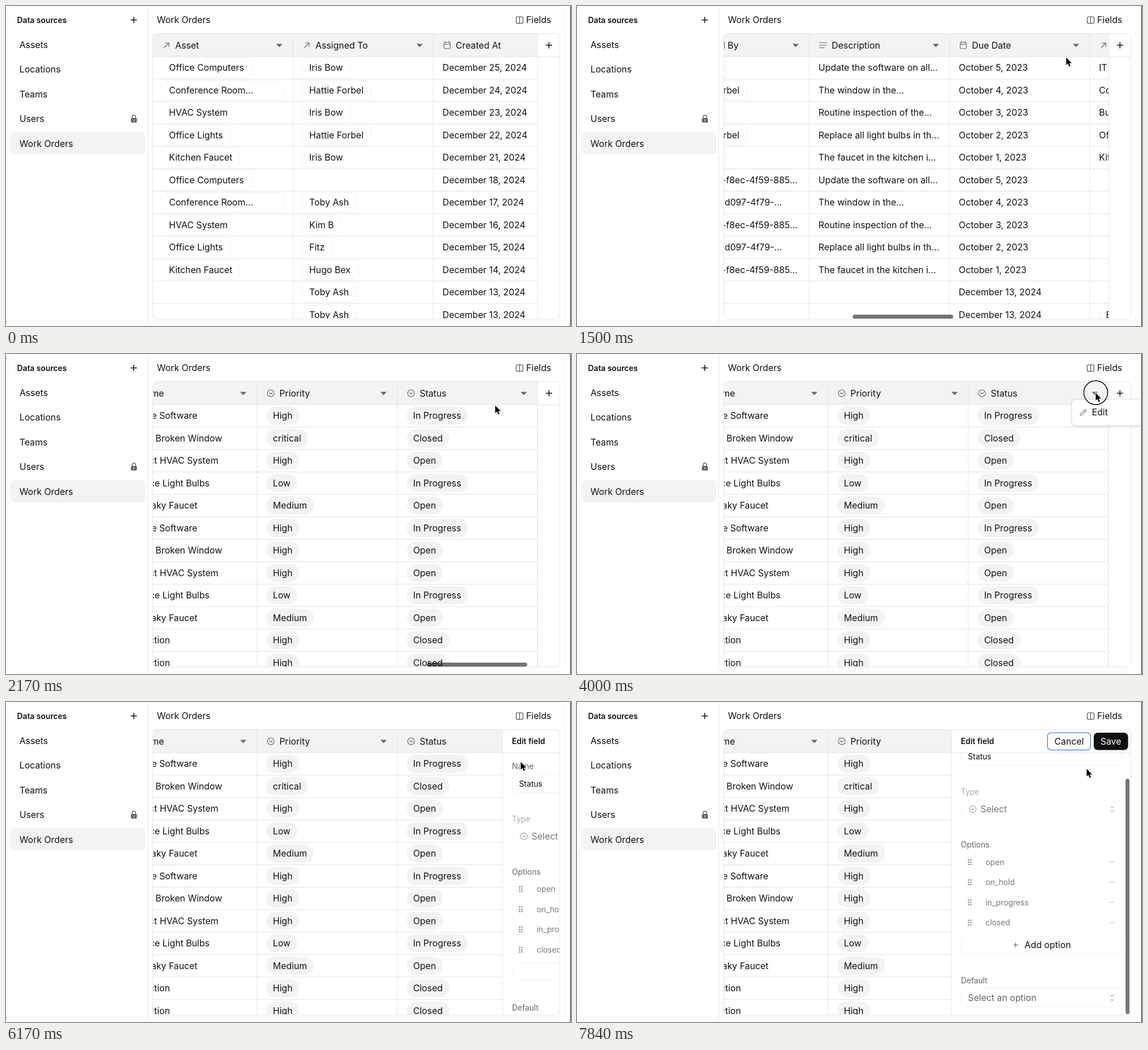
These frames come from a looping animation (995x563 px, 8 s). An HTML page with a canvas:

```html
<!DOCTYPE html>
<html lang="en">
<head>
<meta charset="utf-8">
<title>Work Orders</title>
<style>
html, body { margin: 0; width: 100%; height: 100%; overflow: hidden; background: #fff; }
canvas { display: block; }
</style>
</head>
<body>
<canvas id="stage" width="995" height="563"></canvas>
<script>
const c = document.getElementById('stage').getContext('2d');
const LOOP = 8000, TICK = 1000 / 6;
const COL = 247, ROW = 39.5, LEFT = 258.5, RIGHT = 936, MAX_SCROLL = 1792.5;
const INK = '#111', GRAY = '#666', LINE = '#e6e6e5', SOFT = '#f3f3f2';

// Values: "*" marks an outlined chip, "~" a filled pill.
const people = '*Iris Bow|*Hattie Forbel|*Iris Bow|*Hattie Forbel|*Iris Bow|';
const twice = s => s + s;
const idA = '9a4e0b65-f8ec-4f59-885…|', idB = 'bd341bb2-d097-4f79-…|';
const columns = [
  ['Asset', arrow, twice('*Office Computers|*Conference Room…|*HVAC System|*Office Lights|*Kitchen Faucet|')],
  ['Assigned To', arrow, people + '|*Toby Ash|*Kim B|*Fitz|*Hugo Bex|*Toby Ash|*Toby Ash'],
  ['Created At', calendar, [25, 24, 23, 22, 21, 18, 17, 16, 15, 14, 13, 13].map(d => `December ${d}, 2024`).join('|')],
  ['Created By', arrow, people + twice(idA + idB) + idA + 'Kim B|Kim B'],
  ['Description', lines, twice('Update the software on all…|The window in the…|Routine inspection of the…|Replace all light bulbs in th…|The faucet in the kitchen i…|')],
  ['Due Date', calendar, twice([5, 4, 3, 2, 1].map(d => `October ${d}, 2023|`).join('')) + 'December 13, 2024|December 13, 2024'],
  ['Location', arrow, 'IT Department|Conference Room|Building Roof|Office Floor|Kitchen|||||||*East Wing'],
  ['Name', lines, twice('Update Software|Repair Broken Window|Inspect HVAC System|Replace Light Bulbs|Fix Leaky Faucet|') + 'Inspection|Inspection'],
  ['Priority', select, '~High|~critical|~High|~Low|~Medium|~High|~High|~High|~Low|~Medium|~High|~High'],
  ['Status', select, '~In Progress|~Closed|~Open|~In Progress|~Open|~In Progress|~Open|~Open|~In Progress|~Open|~Closed|~Closed']
].map(([title, icon, cells]) => ({ title, icon, cells: cells.split('|') }));

// Keys are [tick, value...]; null before the first key.
const scrollKeys = [[0, 0], [6, 0], [7, 392], [9, 837.5], [13, MAX_SCROLL]];
const thumbKeys = [[7, 1], [15, 1], [18, 0]];
const cursorKeys = [[3, 850, 330], [4, 860, 150], [5, 861, 90], [15, 861, 90], [18, 913, 68],
  [26, 913, 68], [29, 915, 100], [30, 915, 100], [35, 906, 105], [41, 906, 105], [43, 897, 117]];
const panelKeys = [[37, 215], [38, 50], [39, 0]];
const bodyKeys = [[0, 0], [45, 0], [46, 26], [47, 47.5]];

function at(keys, k) {
  if (k < keys[0][0]) return null;
  const i = keys.findIndex(key => key[0] > k);
  if (i < 0) return keys[keys.length - 1].slice(1);
  const a = keys[i - 1], b = keys[i], u = (k - a[0]) / (b[0] - a[0]);
  return a.slice(1).map((v, j) => v + (b[j + 1] - v) * u);
}

function text(s, x, cy, color = INK, size = 15.8, weight = 400) {
  c.font = `${weight} ${size}px Inter, sans-serif`;
  c.fillStyle = color;
  c.fillText(s, x, cy + size * 0.363);
}
const small = (s, x, cy, color = GRAY, weight = 400) => text(s, x, cy, color, 13.8, weight);

function rect(x, y, w, h, color) {
  c.fillStyle = color;
  c.fillRect(x, y, w, h);
}

function box(x, y, w, h, r, fill, stroke, width = 1) {
  c.beginPath();
  c.roundRect(x, y, w, h, r);
  paint(fill, stroke, width);
}

function shape(d, x, y, fill, stroke, width = 1.2) {
  c.save();
  c.translate(x, y);
  const p = new Path2D(d);
  c.lineJoin = c.lineCap = 'round';
  paint(fill, stroke, width, p);
  c.restore();
}

function paint(fill, stroke, width, path) {
  c.lineWidth = width;
  if (stroke) { c.strokeStyle = stroke; path ? c.stroke(path) : c.stroke(); }
  if (fill) { c.fillStyle = fill; path ? c.fill(path) : c.fill(); }
}

function clip(x, y, w, h, r, draw) {
  c.save();
  c.beginPath();
  c.roundRect(x, y, w, h, r);
  c.clip();
  draw();
  c.restore();
}

function arrow(x, y) { shape('M-4 4L4-4M-2.5-4H4V2.5', x, y, null, GRAY); }
function lines(x, y) { shape('M-6.5-4.5H6.5M-6.5 0H6.5M-6.5 4.5H2.5', x, y, null, GRAY); }
function calendar(x, y) {
  box(x - 5.5, y - 5, 11, 11, 1.5, null, GRAY, 1.1);
  shape('M-5.5-1.5H5.5M-3-7V-4M3-7V-4', x, y, null, GRAY, 1.1);
}
function select(x, y, color = GRAY) {
  shape('M6 0A6 6 0 1 1-6 0A6 6 0 1 1 6 0M-2.6-1L0 1.6L2.6-1', x, y, null, color, 1.1);
}
function plus(x, y, r = 5, color = INK, width = 1.5) {
  shape(`M${-r} 0H${r}M0 ${-r}V${r}`, x, y, null, color, width);
}
function caret(x, y) { shape('M-4.8-2.4H4.8L0 2.6Z', x, y, GRAY, GRAY, 0.6); }
function sorter(x, y) { shape('M-2.5-2.5L0-5L2.5-2.5M-2.5 2.5L0 5L2.5 2.5', x, y, null, '#aaa', 1.1); }

function sidebar() {
  box(3.5, 0.5, 981, 559, 16, '#fff', LINE);
  rect(249, 1, 1, 558, LINE);
  small('Data sources', 19.5, 24.5, INK, 600);
  plus(225, 24.5);
  box(8, 222, 237, 39.5, 8, SOFT);
  ['Assets', 'Locations', 'Teams', 'Users', 'Work Orders'].forEach((s, i) => text(s, 23.7, 68 + 43.5 * i));
  box(220, 197, 10.5, 8, 1.5, GRAY);
  shape('M-3 0V-2A3 3 0 0 1 3-2V0', 225.2, 197, null, GRAY, 1.4);
  rect(224.6, 199.5, 1.2, 3, '#fff');
  text('Work Orders', 265.7, 24.5);
  box(898.5, 19, 12, 11.5, 2, null, '#444', 1.1);
  rect(904, 19, 1.1, 11.5, '#444');
  text('Fields', 916, 24.5);
}

function cell(value, x, cy) {
  const mark = value[0], label = value.replace(/^[*~]/, '');
  if (mark !== '*' && mark !== '~') return text(label, x + 16.3, cy);
  c.font = '400 15.8px Inter, sans-serif';
  const w = c.measureText(label).width, chip = mark === '*';
  if (chip) box(x + 16.5, cy - 16.5, label.endsWith('…') ? 214 : w + 24.5, 33, 7, '#fff', LINE);
  else box(x + 16.5, cy - 16, w + 23.5, 32, 16, SOFT);
  text(label, x + (chip ? 28.6 : 28), cy);
}

function table(scroll, thumb) {
  clip(258.5, 48.5, 717, 502, 7, () => {
    clip(258.5, 48.5, RIGHT - 258.5, 502, 0, () => {
      rect(258, 49, 678, 40, SOFT);
      for (let i = 0; i < 12; i++) rect(258, 88.4 + ROW * i, 678, 1.2, LINE);
      columns.forEach((col, n) => {
        const x = LEFT + COL * n - scroll;
        if (x > RIGHT || x + COL < LEFT) return;
        rect(x + COL - 0.5, 49, 1, 502, LINE);
        col.icon(x + 24.3, 69);
        text(col.title, x + 39.5, 69);
        caret(x + 223, 69.3);
        col.cells.forEach((v, i) => v && cell(v, x, 108.5 + ROW * i));
      });
    });
    rect(936, 49, 1, 502, LINE);
    rect(936, 89, 40, 1, LINE);
    plus(956.2, 69);
    if (thumb) box(261.5 + scroll * 0.2675, 543, 177, 7, 3.5, `rgba(0,0,0,${0.55 * thumb})`);
  });
  box(258.5, 48.5, 717, 502, 7, null, LINE);
}

function menu() {
  c.save();
  c.shadowColor = 'rgba(0,0,0,.2)';
  c.shadowBlur = 7;
  c.shadowOffsetY = 1;
  box(872, 81, 150, 44, 6, '#fff');
  c.restore();
  shape('M-5.5 5.5L-4.5 2L2.8-5.3Q4-6 5.2-4.8Q6-3.8 5.3-2.8L-2 4.5ZM1-3.5L3.5-1', 891.5, 103, null, '#888', 1.1);
  text('Edit', 906.7, 102.7);
}

function panelBody(p, s) {
  const x = p + 16.5, field = (cy, color = LINE) => box(x + 0.5, cy - 15.5 - s, 282.5, 31, 6, '#fff', color);
  small('Name', x, 112.5 - s);
  field(143.5);
  small('Status', p + 29, 143.5 - s, INK);
  small('Type', x, 205.7 - s, '#aaa');
  field(236.2, '#efefee');
  select(p + 37.3, 236.2 - s, '#999');
  text('Select', p + 51, 236.2 - s, '#777');
  sorter(p + 283, 236.2 - s);
  small('Options', x, 298.5 - s);
  ['open', 'on_hold', 'in_progress', 'closed'].forEach((label, i) => {
    const y = 329.2 + 35.5 * i - s;
    for (let d = 0; d < 6; d++) rect(p + 29 + d % 2 * 4, y - 5 + (d >> 1) * 4, 2, 2, GRAY);
    small(label, p + 60, y, '#777');
    rect(p + 277.5, y - 0.5, 9, 1, '#bbb');
  });
  field(475);
  plus(p + 113, 475 - s, 4, GRAY, 1.1);
  text('Add option', p + 128.6, 475 - s);
  small('Default', x, 537.5 - s);
  field(568);
  text('Select an option', p + 29, 568 - s, GRAY);
  sorter(p + 283, 568 - s);
}

function panel(shift, s) {
  const p = 659.5 + shift;
  clip(258.5, 48.5, 717, 502, 7, () => {
    rect(p, 49, 317, 502, '#fff');
    clip(p, 90, 317, 461, 0, () => panelBody(p, s));
    rect(p - 0.5, 49, 1, 502, LINE);
    rect(p, 89, 317, 1, LINE);
    small('Edit field', p + 16.5, 69, INK, 600);
    box(p + 169.5, 54.5, 75, 29.5, 6, '#fff', '#1f5fd0', 2);
    text('Cancel', p + 181.3, 69);
    box(p + 250.5, 54, 60.5, 30.5, 7, '#111');
    text('Save', p + 262.3, 69, '#fff');
    if (s) box(966, 92 + s * 0.905, 7, 414, 3.5, '#777');
  });
  box(258.5, 48.5, 717, 502, 7, null, LINE);
}

function draw(now) {
  const k = Math.floor((now % LOOP + 5) / TICK);
  const [scroll] = at(scrollKeys, k), thumb = at(thumbKeys, k);
  const slide = at(panelKeys, k), cursor = at(cursorKeys, k);
  rect(0, 0, 995, 563, '#fff');
  sidebar();
  table(scroll, thumb && thumb[0]);
  if (slide) panel(slide[0], at(bodyKeys, k)[0]);
  if (k >= 24 && k < 37) menu();
  if (k === 24) box(892.5, 47, 42, 42, 21, null, '#111', 1.5);
  if (cursor) shape('M0 0V13.6L3.1 10.8L5.4 16L7.6 15L5.3 10H9.7Z', cursor[0] + 0.5, cursor[1] + 0.5, '#000', '#fff', 2);
  rect(994, 0, 1, 563, '#111');
}

const start = performance.now();
function frame() {
  draw(performance.now() - start);
  requestAnimationFrame(frame);
}
frame();
</script>
</body>
</html>
```
